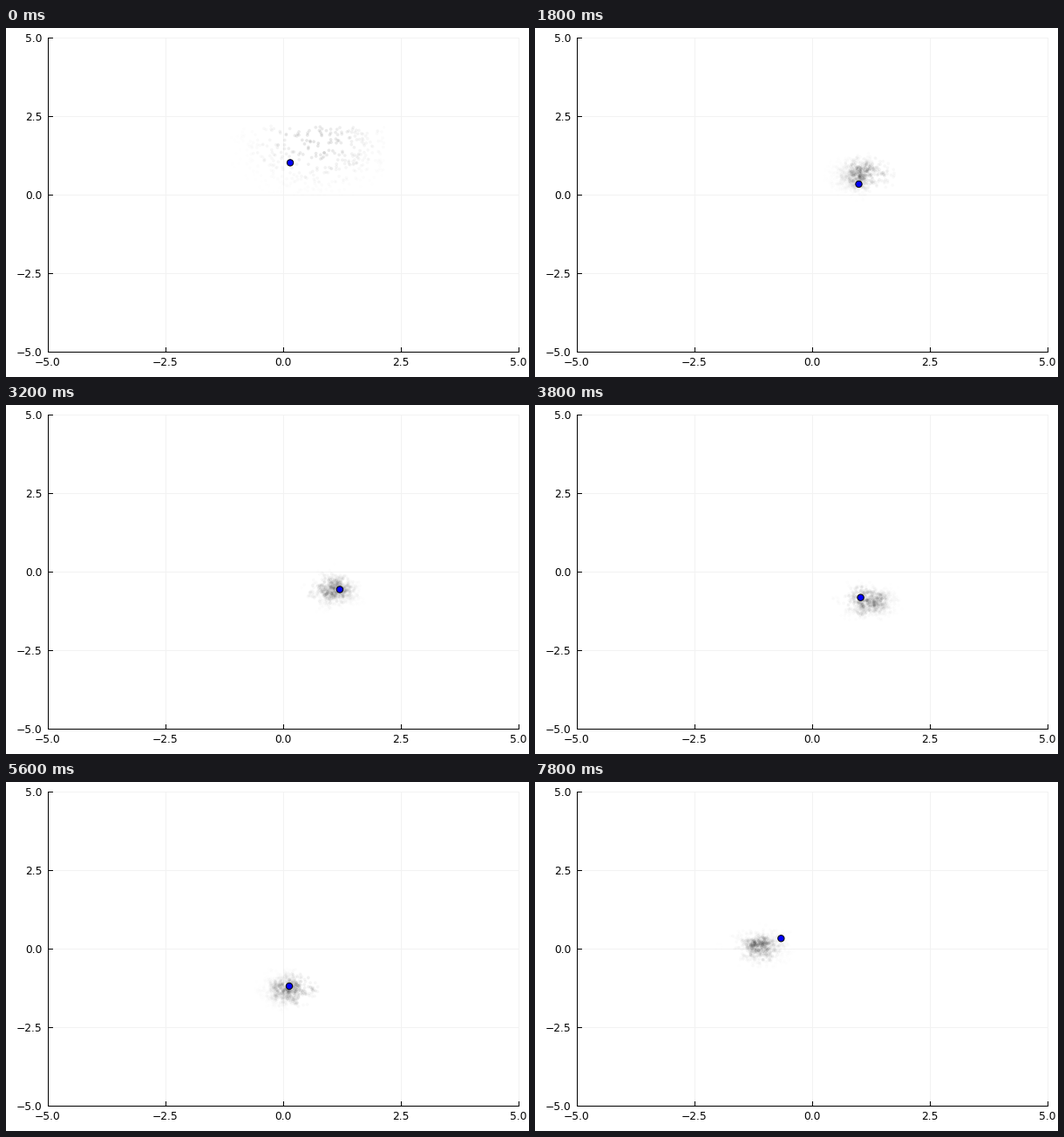
A matplotlib script for the animation above (8 s loop, 600 by 400 pixels).

```python
import numpy as np
import matplotlib.pyplot as plt
from matplotlib.animation import FuncAnimation
from matplotlib.patches import Ellipse

W, H, DPI = 600, 400, 100
FRAMES, STEP = 40, 200
PT = 72 / DPI               # points per pixel
LEFT, BOTTOM = 48.5, 28.5   # plot corner in pixels
UX, UY = 54, 36             # pixels per data unit
LOW, HIGH = -5, 5

# Waypoints of the moving body and of the cloud that trails it
TIMES = np.array([0, 1.0, 2.6, 3.8, 5.6, 6.6, 7.8])
BODY = np.array([(0.14, 1.03), (0.57, 0.86), (1.25, -0.24), (1.02, -0.81),
                 (0.12, -1.18), (-0.37, -0.68), (-0.67, 0.34)])
CLOUD = np.array([(0.62, 1.35), (0.95, 1.2), (0.84, -0.04), (1.25, -0.93),
                  (-0.03, -1.26), (-0.49, -0.82), (-1.08, 0.08)])


def glide(keys, t):
    """Cubic Hermite curve through the keys."""
    slopes = np.gradient(keys, TIMES, axis=0)
    k = min(np.searchsorted(TIMES, t, side="right"), len(TIMES) - 1) - 1
    span = TIMES[k + 1] - TIMES[k]
    u = (t - TIMES[k]) / span
    return ((1 + 2 * u) * (1 - u) ** 2 * keys[k]
            + u * (1 - u) ** 2 * span * slopes[k]
            + u * u * (3 - 2 * u) * keys[k + 1]
            + u * u * (u - 1) * span * slopes[k + 1])


def resample(rng, t, count=700):
    """Clumped cloud whose weight leans to one side and swings over time."""
    center = glide(CLOUD, t)
    spread = 0.26 + 0.13 * np.exp(-t / 1.2)
    lean = np.array([0.1 + 0.24 * np.cos(2 * np.pi * (t - 1.8) / 3.8), 0])
    parents = rng.normal(0, 0.93, (170, 2))
    pts = parents[rng.integers(0, len(parents), count)]
    pts = center + spread * (pts + rng.normal(0, 0.3, (count, 2)))
    stray = count // 45
    pts[:stray] = center + 2 * lean + rng.normal(0, 0.1, (stray, 2))
    return pts, center + lean, 1.35 * spread


def particles(i):
    """Particle positions and opacities for one step."""
    rng = np.random.default_rng(100 + i)
    if i == 0:
        pts = rng.uniform((-1.16, 0), (2.14, 2.2), (400, 2))
        focus, reach, ink = (0.73, 1.7), 0.7, 13
    else:
        pts, focus, reach = resample(rng, i * STEP / 1000)
        ink = 20
    weight = np.exp(-0.5 * (((pts - focus) / reach) ** 2).sum(axis=1))
    return pts, np.minimum(ink * weight / weight.sum(), 0.12)


plt.rcParams["path.snap"] = False
fig = plt.figure(figsize=(W / DPI, H / DPI), dpi=DPI, facecolor="white")
ax = fig.add_axes([LEFT / W, BOTTOM / H,
                   (HIGH - LOW) * UX / W, (HIGH - LOW) * UY / H])
ax.set_xlim(LOW, HIGH)
ax.set_ylim(LOW, HIGH)
ax.axis("off")


def line(xs, ys, color="black", z=3):
    ax.plot(xs, ys, color=color, lw=PT, zorder=z, clip_on=False,
            solid_capstyle="projecting")


def label(value, at, shift, align):
    ax.annotate(f"{value:.1f}".replace("-", "\u2212"), at, shift,
                textcoords="offset pixels", ha=align, va="baseline",
                family="DejaVu Sans", size=12.2 * PT, annotation_clip=False)


for v in np.arange(LOW, HIGH + 0.1, 2.5):
    if v > LOW:
        line([v, v], [LOW, HIGH], "0.95", 1)
        line([LOW, HIGH], [v, v], "0.95", 1)
    line([v, v], [LOW, LOW + 5 / UY])
    line([LOW, LOW + 5 / UX], [v, v])
    label(v, (v, LOW), (-0.6, -15.8), "center")
    label(v, (LOW, v), (-7.2, -4.5), "right")
line([LOW, LOW], [LOW, HIGH])
line([LOW, HIGH], [LOW, LOW])

cloud = ax.scatter([], [], s=(3.7 * PT) ** 2, linewidths=0, zorder=4)
body = ax.add_patch(Ellipse((0, 0), 7.3 / UX, 7.3 / UY, fc="#0000ff",
                            ec="black", lw=PT, zorder=5))


def update(i):
    pts, alpha = particles(i)
    rgba = np.zeros((len(pts), 4))
    rgba[:, 3] = alpha
    cloud.set_offsets(pts)
    cloud.set_facecolors(rgba)
    body.set_center(glide(BODY, i * STEP / 1000))
    return cloud, body


anim = FuncAnimation(fig, update, frames=FRAMES, interval=STEP,
                     init_func=lambda: update(0), repeat=True, repeat_delay=0)
plt.show()
```
